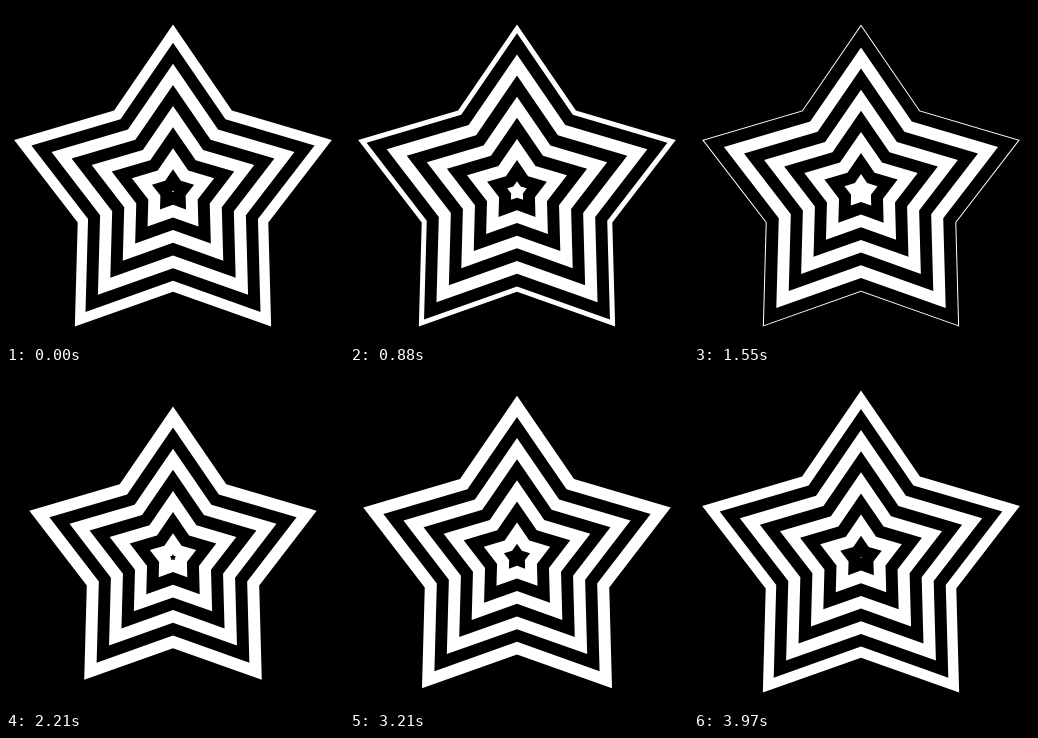
Write an HTML page with a canvas that moves like this. It is 338 px wide and 338 px high and loops after 4000 ms.

```html
<!DOCTYPE html>
<html lang="en">
<head>
<meta charset="utf-8">
<title>Expanding stars</title>
<style>
  html, body { margin: 0; height: 100%; background: #000; overflow: hidden; }
  canvas { display: block; }
</style>
</head>
<body>
<canvas width="338" height="338"></canvas>
<script>
const ctx = document.querySelector('canvas').getContext('2d');
const LOOP = 4000, STEP = 21.12, MAX = 167, CX = 167, CY = 185.5;

function star(radius, color) {
  ctx.beginPath();
  for (let i = 0; i < 10; i++) {
    const r = i % 2 ? radius * 0.6 : radius;
    const a = i * Math.PI / 5;
    ctx.lineTo(CX + r * Math.sin(a), CY - r * Math.cos(a));
  }
  ctx.fillStyle = color;
  ctx.fill();
}

function draw(now) {
  const shift = 2 * (now % LOOP) / LOOP;
  const radius = k => (k + shift) * STEP + 1;
  ctx.fillStyle = '#000';
  ctx.fillRect(0, 0, 338, 338);
  // Nested stars grow outwards; the outermost stops at MAX until the next one covers it.
  for (let k = 8; radius(k) > 0; k--) {
    if (radius(k - 1) < MAX) star(Math.min(radius(k), MAX), k % 2 ? '#000' : '#fff');
  }
}

const start = performance.now();
function tick() {
  draw(performance.now() - start);
  requestAnimationFrame(tick);
}
tick();
</script>
</body>
</html>
```
